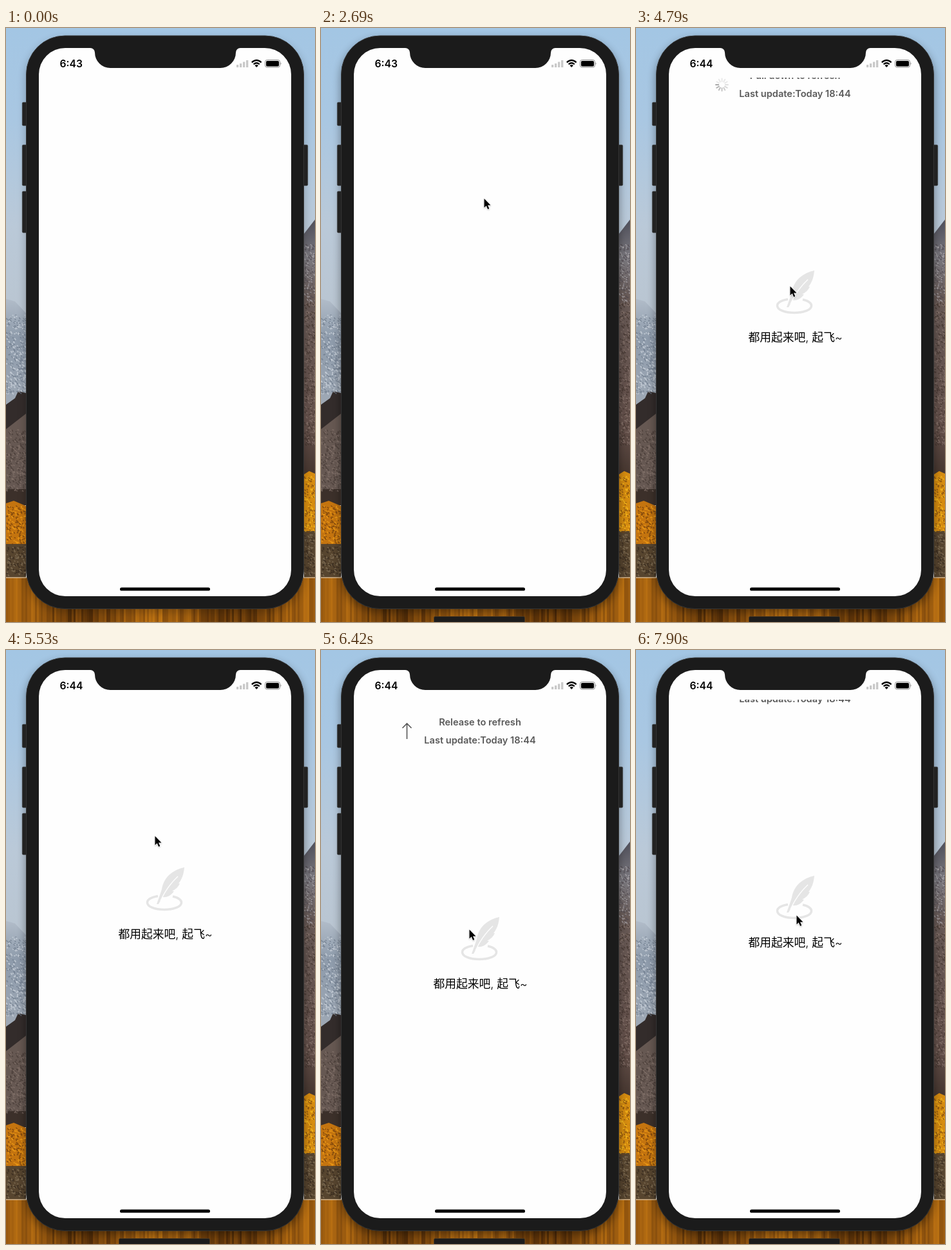
An HTML page that plays this animation: 480x921 px, repeating every 8 s.

```html
<!DOCTYPE html>
<html lang="zh-CN">
<head>
<meta charset="utf-8">
<title>Pull to refresh</title>
<style>
  html, body { margin: 0; height: 100%; overflow: hidden; }
  svg { display: block; width: 480px; height: 921px; }
  text { font-family: Inter, "Noto Sans CJK SC", "Noto Sans CJK", sans-serif; }
  .label { font-size: 14.6px; font-weight: 600; fill: #5a5a5a; text-anchor: middle; }
  #clock { font-size: 15.7px; font-weight: 600; }
  #note { font-size: 17.8px; font-weight: 300; text-anchor: middle; }
</style>
</head>
<body>
<svg viewBox="0 0 480 921">
  <defs>
    <linearGradient id="sky" x2="0" y2="1">
      <stop stop-color="#a3c6e4"/><stop offset=".25" stop-color="#a9c7e2"/>
      <stop offset=".55" stop-color="#bac9d8"/><stop offset="1" stop-color="#b9c2cb"/>
    </linearGradient>
    <linearGradient id="snow" x2="0" y2="1">
      <stop stop-color="#b1bcc9"/><stop offset=".3" stop-color="#8e9bab"/><stop offset="1" stop-color="#a4adb8"/>
    </linearGradient>
    <linearGradient id="rock" x2="0" y2="1">
      <stop stop-color="#4f4f5a"/><stop offset=".15" stop-color="#7c7a80"/>
      <stop offset=".3" stop-color="#675955"/><stop offset=".8" stop-color="#64504a"/><stop offset="1" stop-color="#42332c"/>
    </linearGradient>
    <filter id="blur"><feGaussianBlur stdDeviation="7"/></filter>
    <filter id="soft" x="-50%" width="200%"><feGaussianBlur stdDeviation="1"/></filter>
    <clipPath id="content"><path d="M51 77H443V867H51z"/></clipPath>
  </defs>

  <g id="wallpaper">
    <path fill="url(#sky)" d="M0 0H480V560H0z"/>
    <path fill="url(#snow)" d="M0 420L14 424 31 442V620H0z"/>
    <path fill="url(#rock)" d="M480 297L463 319V700H480z"/>
    <path fill="#665852" d="M0 590H40V740H0z"/>
    <path fill="#332c2b" d="M0 584L14 574 19 563 31 566V598L0 622z"/>
    <path fill="#3c302a" d="M0 715H31V740H0z"/>
    <path fill="#c4740f" d="M0 737L12 733 31 741V803H0z"/>
    <path fill="#d68c10" d="M463 692L471 687 480 691V785H463z"/>
    <path fill="#57452f" d="M0 800H31V853H0zM463 780H480V853H463z"/>
  </g>

  <rect id="shadow" x="31" y="18" width="432" height="888" rx="60" filter="url(#blur)"/>
  <g fill="#222" stroke="#373737" stroke-width=".7">
    <rect x="25.3" y="115.3" width="9" height="36" rx="1.5"/>
    <rect x="25.3" y="181.3" width="9" height="63" rx="1.5"/>
    <rect x="25.3" y="253.3" width="9" height="64" rx="1.5"/>
    <rect x="460" y="181.3" width="8.7" height="63" rx="1.5"/>
  </g>
  <rect x="31.5" y="12" width="431" height="888.5" rx="60" fill="#1b1b1b" stroke="#343434"/>
  <rect x="51" y="31" width="392" height="850" rx="41" fill="#fefefe"/>
  <path fill="#1b1b1b" d="M131 30V31A7 7 0 0 1 138 38A24 24 0 0 0 162 62H333A24 24 0 0 0 357 38A7 7 0 0 1 364 31V30z"/>
  <rect x="177" y="867.4" width="140" height="5.2" rx="2.6"/>

  <text id="clock" x="83.5" y="61">6:43</text>
  <path fill="#c9c9c9" d="M358 57h3.3v4h-3.3zM363 55h3.3v6h-3.3zM368 52.5h3.3v8.5h-3.3zM373 50h3.3v11h-3.3z"/>
  <path d="M381.8 53.4Q389.2 46.6 396.6 53.4M384.6 56.3Q389.2 52.2 393.8 56.3" fill="none" stroke="#000" stroke-width="2.2"/>
  <path d="M386.4 58.1Q389.2 55.9 392 58.1L389.2 61z"/>
  <rect x="402.5" y="49.5" width="23" height="11.4" rx="3" fill="none" stroke="#8b8b8b"/>
  <rect x="404" y="51" width="20" height="8.4" rx="1.7"/>
  <path fill="#8b8b8b" d="M426.6 53.3q2 1.9 0 3.8z"/>

  <g clip-path="url(#content)">
    <g id="scroll">
      <text id="state" class="label" x="247" y="40.2"></text>
      <text id="updated" class="label" x="247" y="68.2"></text>
      <path id="arrow" d="M0-12V11.5M-7 5L0 12 7 5" fill="none" stroke="#575757" stroke-width="1.6"/>
      <g id="spinner" transform="translate(133.5 49)" stroke="#777" stroke-width="2" stroke-linecap="round"></g>
      <g id="empty">
        <path d="M236 381.5C225 383.5 219.5 387 219.5 391.5 219.5 398 231 402.5 246 402.5S272.5 398 272.5 391.5C272.5 387.5 267 384 259 382" fill="none" stroke="#e5e5e5" stroke-width="3.6"/>
        <path d="M277 337C259 341 245 352 242 371L239 380 234 394H237L243 383C251 384 257 380 261 374L258 374C264 371 268 367 270 362L268 362C273 356 276 348 277 337z" fill="#e5e5e5"/>
        <path d="M267 351Q250 367 240 389" fill="none" stroke="#fefefe" stroke-width="1.3"/>
        <text id="note" x="247.5" y="446.5">都用起来吧, 起飞~</text>
      </g>
    </g>
  </g>

  <rect id="dock" x="175.5" y="912.5" width="141" height="20" rx="2" fill="#1c1c1c" stroke="#493720"/>
  <g id="cursor">
    <path d="M0 1V16.5L3.6 13.3 6 18.5 9 17.2 6.7 12.2H11.5z" opacity=".3" filter="url(#soft)"/>
    <path d="M.5.5V14.6L3.7 11.6 6.1 17 8.3 16 6 10.8H10.5z" stroke="#fff" stroke-width="1.5" paint-order="stroke"/>
  </g>
</svg>
<script>
const $ = id => document.getElementById(id);
const add = (parent, tag, attrs) => {
  const el = parent.appendChild(document.createElementNS('http://www.w3.org/2000/svg', tag));
  for (const k in attrs) el.setAttribute(k, attrs[k]);
  return el;
};

let seed = 7;
const rnd = () => (seed = seed * 16807 % 2147483647) / 2147483647;

// Scatters light and dark flecks over one side strip of the wallpaper
function flecks(right, top, bottom, ...colors) {
  const x = right ? 463 : 0, w = right ? 17 : 31;
  for (const stroke of colors) {
    let d = '';
    for (let i = 0; i < w * (bottom - top) / 22; i++)
      d += `M${(x + rnd() * w).toFixed(1)} ${(top + rnd() * (bottom - top)).toFixed(1)}l2 ${(rnd() * 3).toFixed(1)}`;
    add($('wallpaper'), 'path', { d, stroke, 'stroke-width': 1.6, opacity: .7 });
  }
}
flecks(0, 445, 567, '#d3dae2', '#6d7a8b');
flecks(0, 622, 718, '#87766e', '#463a35');
flecks(0, 740, 800, '#f7a318', '#6b3a0d');
flecks(0, 804, 848, '#8a795f', '#33271d');
flecks(1, 335, 425, '#b2aeb2', '#514a50');
flecks(1, 425, 645, '#8b7870', '#43352f');
flecks(1, 694, 782, '#ffc420', '#7d470e');
flecks(1, 785, 848, '#8a795f', '#33271d');

// Lake with vertical reflections and a bright shore line
for (let x = 0; x < 480; x += 3) {
  const light = 29 + 7 * Math.cos(x / 38) + 12 * (rnd() - .5);
  add($('wallpaper'), 'rect', { x, y: 853, width: 3.2, height: 68, fill: `hsl(${27 + light / 6} 82% ${light}%)` });
}
add($('wallpaper'), 'path', { d: 'M0 851.5H480V853H0z', fill: '#d8b58a' });

const spokes = Array.from({ length: 12 }, (_, i) =>
  add($('spinner'), 'line', { y1: -5.3, y2: -9.5, transform: `rotate(${i * 30})` }));

const clamp = v => Math.max(0, Math.min(1, v));
const easeOut = k => 1 - (1 - k) ** 1.5;
const easeInOut = k => (1 - Math.cos(Math.PI * k)) / 2;

// Time, x and y of the pointer's stops
const stops = [
  [1790, 290, 230], [2090, 254, 254], [2690, 253, 264], [3290, 238, 402], [4790, 239, 400],
  [5530, 230, 278], [6420, 230, 433], [7600, 230, 433], [7900, 249, 411]
];
function pointer(t) {
  const i = Math.max(1, stops.findIndex(s => s[0] > t));
  const [a, b] = t < 7900 ? [stops[i - 1], stops[i]] : stops.slice(-2);
  const k = easeOut(clamp((t - a[0]) / (b[0] - a[0])));
  return [a[1] + (b[1] - a[1]) * k, a[2] + (b[2] - a[2]) * k];
}

const HEADER = 56;
const pulls = [
  { grab: 2690, rest: 3290, drop: 3590, done: 4640 },
  { grab: 5530, rest: 6420, drop: 6710, done: 7620 }
];
// The content follows the finger at half its speed
const pulled = (p, t) => (pointer(Math.min(t, p.rest))[1] - pointer(p.grab)[1]) / 2;

function snap(t) {
  if (t < 1790) return t;
  return t < 5390 ? 1790 + Math.floor((t - 1790) / 150) * 150
                  : 5390 + Math.floor((t - 5390) / 147.1) * 147.5;
}

function draw(time) {
  const t = snap(time);
  const p = pulls[t < 5400 ? 0 : 1];
  const ended = t >= p.done;
  const loading = t >= p.drop && !ended;
  const closing = clamp((t - p.done) / 410);

  let offset = 0;
  if (ended) offset = HEADER * (1 - easeInOut(closing));
  else if (loading) offset = HEADER + (pulled(p, t) - HEADER) * (1 - easeOut(clamp((t - p.drop + 100) / 400)));
  else if (t > p.grab) offset = pulled(p, t);
  offset = Math.floor(offset);
  const ready = !loading && !ended && offset > HEADER;

  $('scroll').setAttribute('transform', `translate(0 ${offset})`);
  $('state').textContent = loading ? 'Loading ...' : ready ? 'Release to refresh' : 'Pull down to refresh';
  $('updated').textContent = 'Last update:Today 18:4' + (t < 4640 ? 3 : 4);
  $('clock').textContent = '6:4' + (t < 3890 ? 3 : 4);

  const turn = 180 * clamp((offset - 50) / 14);
  $('arrow').setAttribute('transform', `translate(133.5 49) rotate(${turn})`);
  $('arrow').style.opacity = loading || (ended && closing < 1) ? 0 : 1;

  $('spinner').style.opacity = loading ? 1 : ended ? 1 - closing : 0;
  const lead = Math.floor(t * .012) % 12;
  spokes.forEach((s, i) => s.setAttribute('opacity', Math.max(.25, 1 - (lead - i + 12) % 12 * .11)));

  $('empty').style.opacity = t < 4640 ? 0 : 1;
  $('dock').style.opacity = $('cursor').style.opacity = t < 1790 ? 0 : 1;
  $('shadow').style.opacity = t < 1790 ? .25 : .4;
  $('cursor').setAttribute('transform', `translate(${pointer(t).map(Math.round)})`);
}

const start = performance.now();
function frame() {
  draw((performance.now() - start) % 8000);
  requestAnimationFrame(frame);
}
frame();
</script>
</body>
</html>
```
